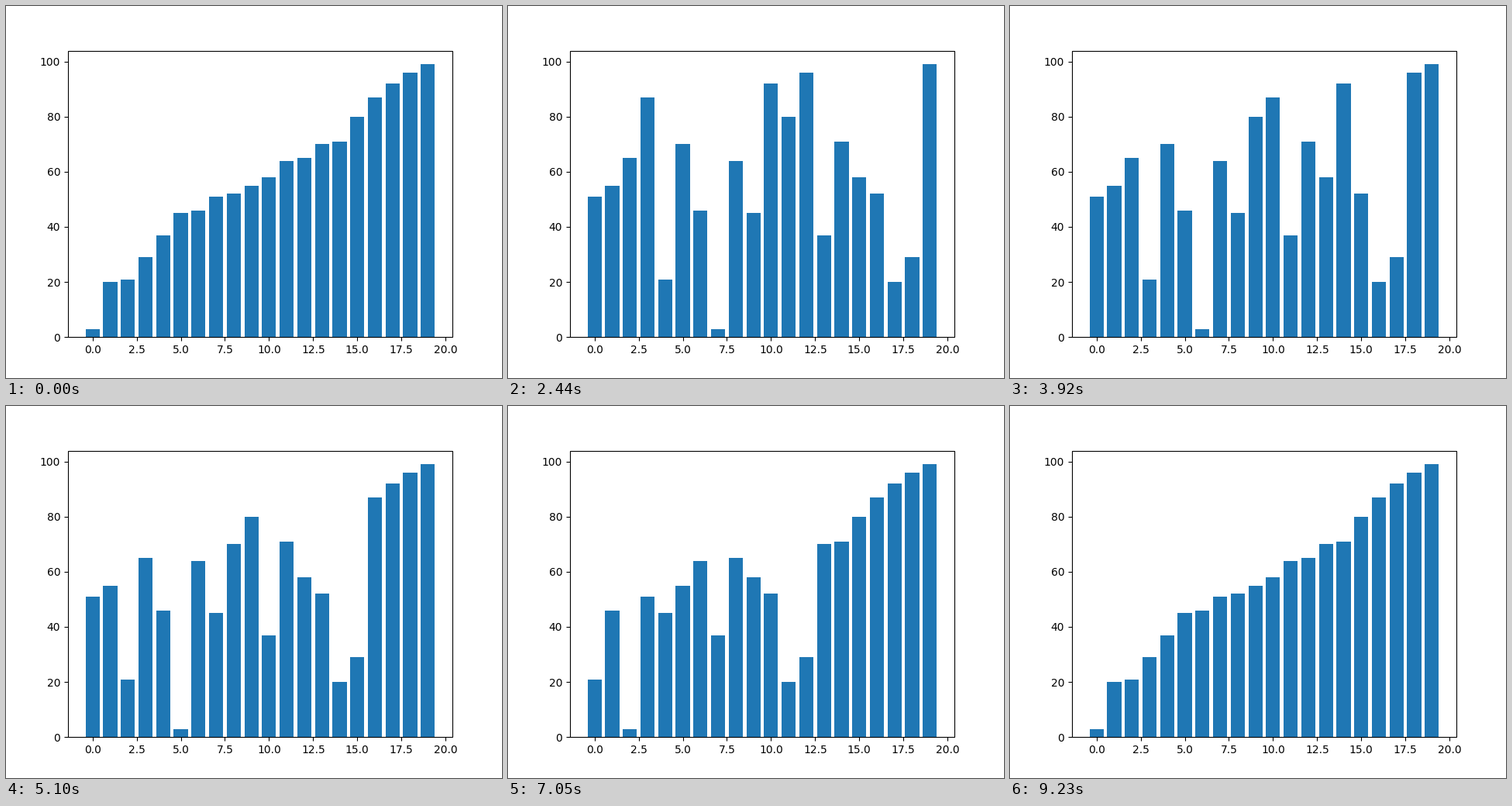
Write a matplotlib script that moves like this. It is 640x480 px and loops after 9.29 s.

```python
from itertools import groupby

import matplotlib.pyplot as plt
from matplotlib.animation import FuncAnimation
from matplotlib.patches import Rectangle

TICK_MS = 10
FRAMES = 774
START = [87, 51, 96, 55, 65, 92, 21, 70, 46, 3,
         64, 45, 80, 99, 37, 71, 58, 52, 20, 29]
FIRST_INDEX = 2  # the first pass is already under way
N = len(START)


def bubble_sort(values):
    """Yield the list after every comparison."""
    a = list(values)
    for done in range(N - 1):
        for j in range(0 if done else FIRST_INDEX, N - 1 - done):
            if a[j] > a[j + 1]:
                a[j], a[j + 1] = a[j + 1], a[j]
            yield list(a)


def build_timeline():
    """One state per tick; a lone step lasts ten ticks, a run one tick per step."""
    steps = [sorted(START), START, *bubble_sort(START), sorted(START)]
    timeline = []
    for state, run in groupby(steps):
        count = len(list(run))
        timeline += [state] * (10 if count == 1 else count)
    return timeline


timeline = build_timeline()
loop_ms = TICK_MS * len(timeline)

plt.rcParams["font.family"] = "DejaVu Sans"
fig = plt.figure(figsize=(6.4, 4.8), dpi=100)
ax = fig.add_subplot()
bars = ax.bar(range(N), timeline[0], color="#1f77b4")
ax.set_xlim(-1.39, 20.39)
ax.set_ylim(0, 103.95)

# Light fixed frame, ticks and labels: much faster to redraw than live axes.
ax.set_axis_off()
ax.add_patch(Rectangle((0, 0), 1, 1, transform=ax.transAxes, fill=False,
                       edgecolor="black", lw=0.8, clip_on=False, zorder=2.5))


def add_ticks(xs, ys, labels, marker, line_transform, text_transform):
    ax.plot(xs, ys, ls="none", marker=marker, ms=3.5, mew=0.8, color="black",
            transform=line_transform, clip_on=False, zorder=2.6,
            scalex=False, scaley=False)
    transform, va, ha = text_transform
    for x, y, label in zip(xs, ys, labels):
        ax.text(x, y, label, transform=transform, va=va, ha=ha, fontsize=10)


x_ticks = [2.5 * k for k in range(9)]
y_ticks = [20 * k for k in range(6)]
add_ticks(x_ticks, [0] * 9, [f"{x:.1f}" for x in x_ticks], 3,
          ax.get_xaxis_transform(), ax.get_xaxis_text1_transform(7))
add_ticks([0] * 6, y_ticks, [str(y) for y in y_ticks], 0,
          ax.get_yaxis_transform(), ax.get_yaxis_text1_transform(7))


def update(frame):
    # Last tick that begins within this frame.
    tick = ((frame + 1) * len(timeline) - 1) // FRAMES
    for bar, value in zip(bars, timeline[tick]):
        bar.set_height(value)
    return bars.patches


anim = FuncAnimation(fig, update, frames=FRAMES, interval=loop_ms / FRAMES,
                     init_func=lambda: update(0), repeat=True, repeat_delay=0,
                     cache_frame_data=False)
plt.show()
```
